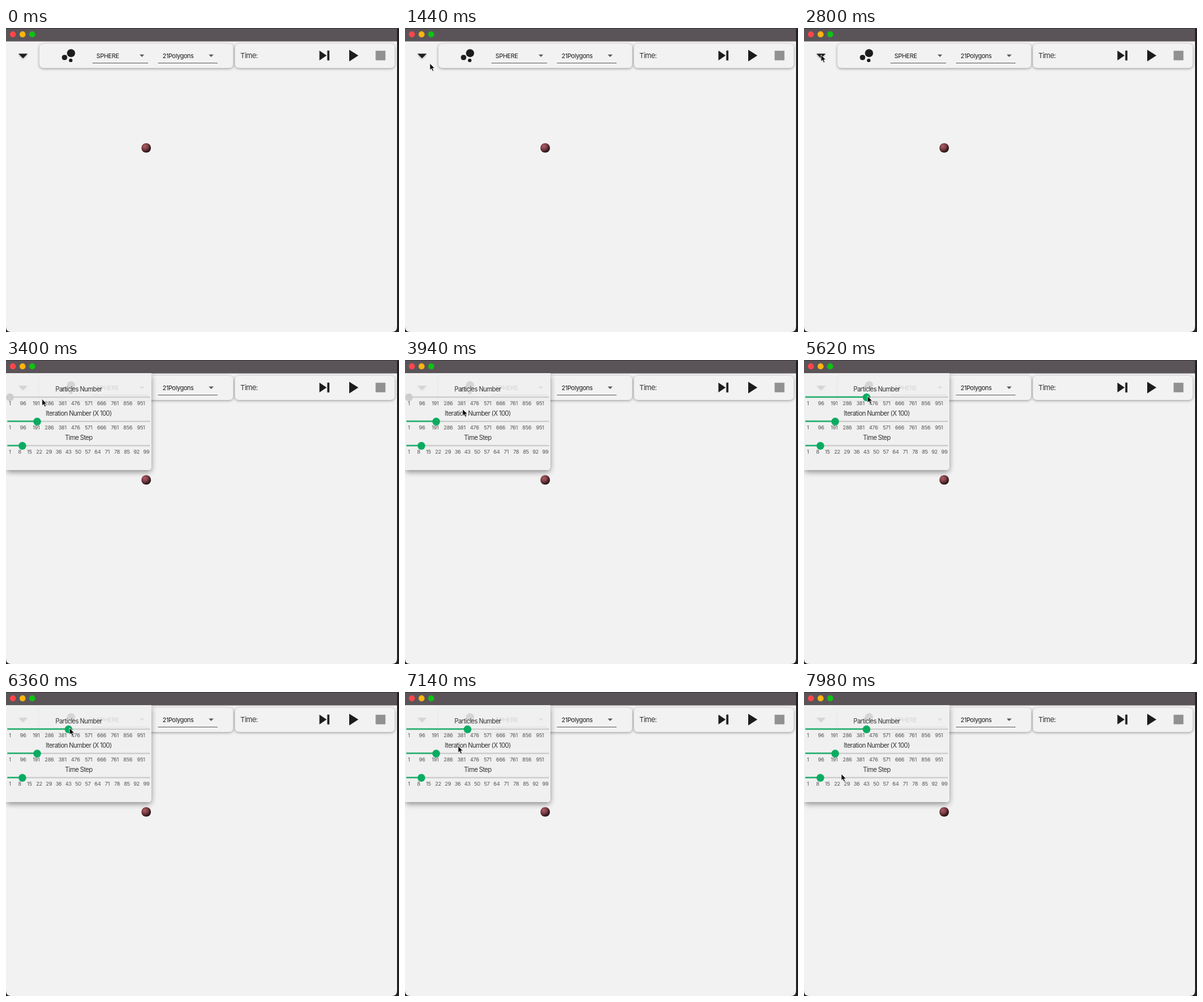
Write an HTML page that moves like this. It is 600x464 px and loops after 8000 ms.

```html
<!DOCTYPE html>
<html lang="en">
<head>
<meta charset="utf-8">
<title>Particle settings</title>
<style>
  html, body { margin: 0; width: 100%; height: 100%; overflow: hidden; background: #222022; }
  svg { display: block; width: 100vw; height: 100vh; }
  text { font-family: Inter, "Open Sans", sans-serif; fill: #333; }
  .label { font-size: 9.7px; letter-spacing: -.5px; text-anchor: middle; }
  .tick { font-size: 8px; letter-spacing: -.3px; text-anchor: middle; fill: #555; }
  .choice { font-size: 9.4px; letter-spacing: -.3px; fill: #161616; }
  .time { font-size: 11px; letter-spacing: -.5px; }
  .card { fill: #f2f2f2; filter: drop-shadow(0 1px 2px rgba(0, 0, 0, .38)); }
  .panel { fill: #f1f1f1; fill-opacity: .87; }
  .icon { fill: #1c1c1c; }
</style>
</head>
<body>
<svg viewBox="0 0 600 464">
  <defs>
    <radialGradient id="ball" cx=".36" cy=".32" r=".72">
      <stop offset="0" stop-color="#ad5d64"/>
      <stop offset=".45" stop-color="#7d3f47"/>
      <stop offset=".8" stop-color="#3d1d22"/>
      <stop offset="1" stop-color="#160b0d"/>
    </radialGradient>
    <filter id="soft" x="-20%" y="-20%" width="140%" height="140%">
      <feGaussianBlur stdDeviation="4.5"/>
    </filter>
    <clipPath id="outside"><path clip-rule="evenodd" d="M0 20H260V210H0ZM0 20H222V163Q222 168 217 168H0Z"/></clipPath>
  </defs>

  <path fill="#f2f2f2" d="M0 0H597V456Q597 464 589 464H8Q0 464 0 456Z"/>
  <rect width="597" height="20.5" fill="#5a5459"/>
  <rect width="600" height="1" fill="#3a373a"/>
  <circle cx="10.5" cy="9.7" r="4.6" fill="#fd4648"/>
  <circle cx="25.3" cy="9.7" r="4.6" fill="#fdb40f"/>
  <circle cx="40" cy="9.7" r="4.6" fill="#0fc314"/>

  <rect class="card" x="51" y="24" width="296" height="37" rx="6"/>
  <rect class="card" x="349.5" y="24" width="244" height="37" rx="6"/>

  <path class="icon" d="M19 39.3H33L26 46.3Z" style="filter: drop-shadow(0 1px 1.5px rgba(0,0,0,.35))"/>
  <circle class="icon" cx="99.3" cy="38.4" r="6.2"/>
  <g id="smallDots" class="icon">
    <circle cx="89.4" cy="45" r="4.1"/>
    <circle cx="98.8" cy="49.4" r="2.7"/>
  </g>
  <text class="choice" x="138" y="45.7">SPHERE</text>
  <text class="choice" x="239" y="45.7">21Polygons</text>
  <path fill="#555" d="M204 40.5H211L207.5 44.3ZM309.5 40.5H317L313.2 44.3Z"/>
  <path stroke="#6a6a6a" d="M132 53.5H217M232 53.5H323"/>
  <text class="time" x="357.8" y="46.3">Time:</text>
  <path class="icon" d="M478.5 34.5L489.5 42L478.5 49.5ZM490.5 34.5H493.7V49.5H490.5ZM524 33.2L538 42L524 51Z"/>
  <rect x="564.3" y="34.7" width="15" height="14.6" fill="#919191"/>

  <circle cx="214" cy="183" r="7.3" fill="url(#ball)"/>

  <g id="popup">
    <g clip-path="url(#outside)">
      <rect y="23" width="222" height="148" rx="5" fill="#000" opacity=".42" filter="url(#soft)"/>
    </g>
    <path class="panel" d="M0 20H222V163Q222 168 217 168H0Z"/>
    <g id="sliders"></g>
  </g>

  <path id="cursor" d="M0 0V10.2L2.3 8.1L4 12L5.8 11.2L4.2 7.4H7.3Z" fill="#050505" stroke="#fff" stroke-width=".7"/>
</svg>
<script>
const LOOP = 8000;
const GREEN = '#0cab62';
const el = id => document.getElementById(id);

// Key points: [time, x, y]
const cursorPath = [
  [950, 104, 150], [1440, 38, 54], [1800, 29, 45], [2300, 26, 41], [3150, 26, 41],
  [3500, 62, 64], [3940, 88, 75], [4350, 8, 56], [4500, 8, 56], [4900, 78, 56],
  [5350, 97, 55], [6800, 97, 55], [7500, 64, 112], [7900, 57, 125], [8000, 57, 125]
];
const thumbPath = [[4500, 6], [4900, 65.5], [5400, 95.5]];

function along(keys, t) {
  if (t <= keys[0][0]) return keys[0].slice(1);
  for (let i = 1; i < keys.length; i++) {
    const [t0, ...a] = keys[i - 1], [t1, ...b] = keys[i];
    if (t > t1) continue;
    const p = (t - t0) / (t1 - t0), s = p * p * (3 - 2 * p);
    return a.map((v, k) => v + (b[k] - v) * s);
  }
  return keys[keys.length - 1].slice(1);
}

function slider(title, y, thumbX, step, count, gap) {
  const ticks = Array.from({ length: count }, (_, i) =>
    `<text class="tick" x="${6 + i * gap}" y="${y + 12}">${1 + i * step}</text>`).join('');
  return `<g>
    <text class="label" x="111" y="${y - 8.6}">${title}</text>${ticks}
    <path d="M2 ${y}H220" stroke="#c6c6c6" stroke-width="1.6"/>
    <path class="fill" d="M2 ${y}H${thumbX}" stroke="${GREEN}" stroke-width="2"/>
    <circle class="thumb" cx="${thumbX}" cy="${y + .4}" r="5.9" fill="${GREEN}"/></g>`;
}

el('sliders').innerHTML =
  slider('Particles Number', 56.6, 6, 95, 11, 20) +
  slider('Iteration Number (X 100)', 93.6, 47.6, 95, 11, 20) +
  slider('Time Step', 130.6, 25, 7, 15, 14.87);
const fill = document.querySelector('.fill');
const thumb = document.querySelector('.thumb');

function draw(now) {
  const t = now % LOOP;

  const [x, y] = along(cursorPath, t);
  el('cursor').setAttribute('transform', `translate(${x} ${y})`);
  el('cursor').style.display = t < 950 ? 'none' : '';

  const [open] = along([[3000, 0], [3250, 1]], t);
  el('popup').setAttribute('transform', `translate(0 20) scale(${open}) translate(0 -20)`);
  el('popup').style.display = open ? '' : 'none';
  el('popup').style.opacity = open;
  el('smallDots').style.opacity = along([[4500, 1], [5100, 0]], t)[0];

  const [thumbX] = along(thumbPath, t);
  const atMinimum = thumbX <= 6;
  thumb.setAttribute('cx', thumbX);
  thumb.setAttribute('fill', atMinimum ? '#cdcdcd' : GREEN);
  fill.setAttribute('d', atMinimum ? '' : `M2 56.6H${thumbX}`);

  requestAnimationFrame(draw);
}
requestAnimationFrame(draw);
</script>
</body>
</html>
```
